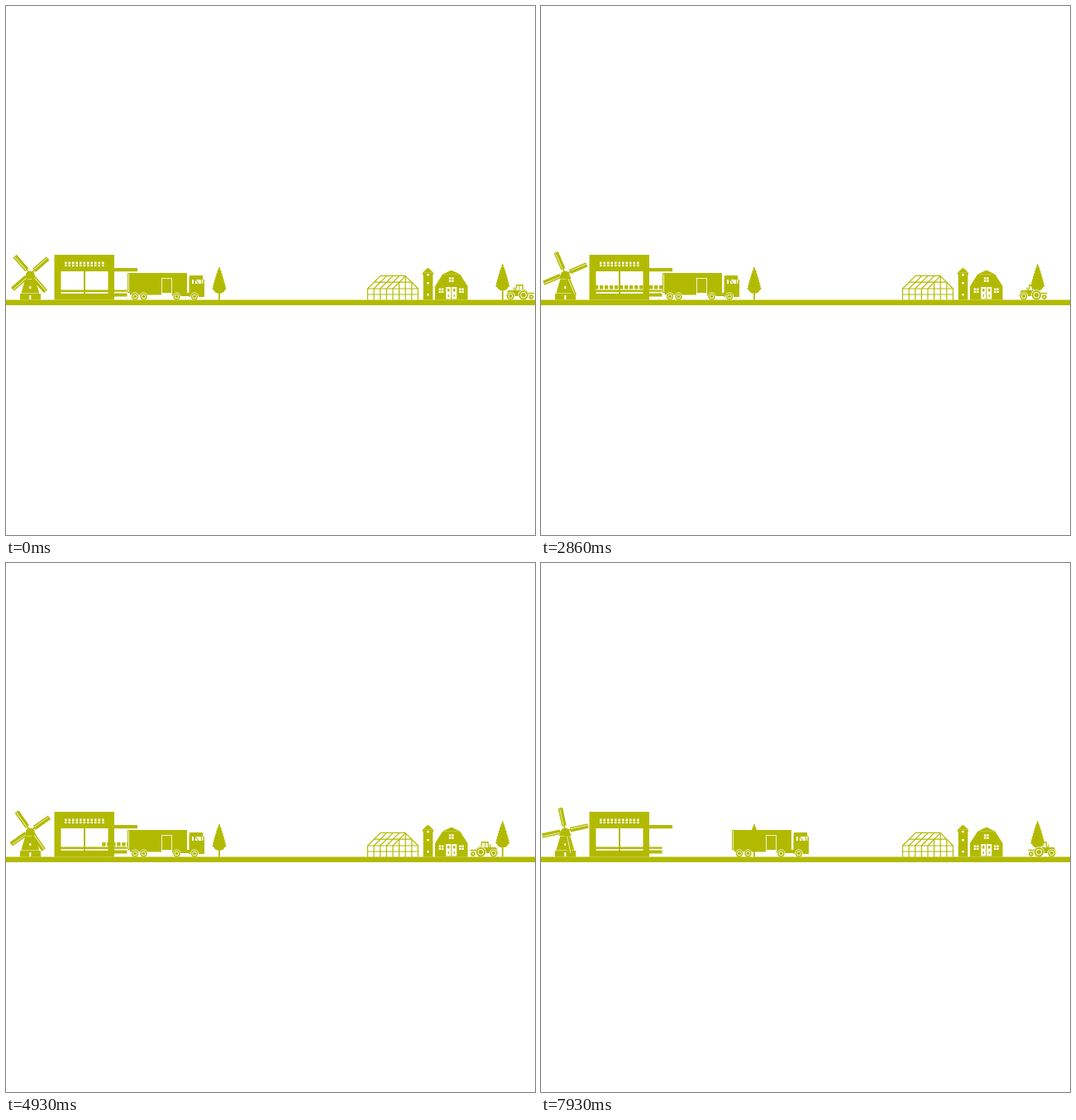
Write an HTML page with a canvas that moves like this. It is 640x640 px and loops after 8000 ms.

```html
<!DOCTYPE html>
<html lang="en">
<head>
<meta charset="utf-8">
<title>Farm to factory</title>
<style>
  html, body { margin: 0; height: 100%; overflow: hidden; background: #fff; }
  canvas { display: block; width: 100vmin; height: 100vmin; }
</style>
</head>
<body>
<canvas id="stage" width="640" height="640"></canvas>
<script>
const ctx = document.getElementById('stage').getContext('2d');
const GREEN = '#b2ba00', WHITE = '#fff';
const LOOP = 8000, FPS = 14;
const GROUND = 355.5;

function rect(x, y, w, h, color = GREEN) {
  ctx.fillStyle = color;
  ctx.fillRect(x, y, w, h);
}

function line(x1, y1, x2, y2, width = 1.2, color = GREEN) {
  ctx.beginPath();
  ctx.moveTo(x1, y1);
  ctx.lineTo(x2, y2);
  ctx.strokeStyle = color;
  ctx.lineWidth = width;
  ctx.stroke();
}

// Symmetric shape around x = cx; halfWidth(u) with u from 0 (top) to 1 (bottom)
function profile(cx, top, bottom, halfWidth, steps = 1) {
  ctx.beginPath();
  for (const side of [1, -1]) {
    for (let i = 0; i <= steps; i++) {
      const u = (side > 0 ? i : steps - i) / steps;
      ctx.lineTo(cx + side * halfWidth(u), top + (bottom - top) * u);
    }
  }
  ctx.fillStyle = GREEN;
  ctx.fill();
}

function taper(cx, top, topWidth, bottom, bottomWidth) {
  profile(cx, top, bottom, u => (topWidth + (bottomWidth - topWidth) * u) / 2);
}

function disc(x, y, r, color = GREEN, start = 0) {
  ctx.beginPath();
  ctx.arc(x, y, r, start, Math.PI * 2);
  ctx.fillStyle = color;
  ctx.fill();
}

function wheel(x, y) {
  const r = GROUND - y;
  disc(x, y, r + 0.8, WHITE);
  disc(x, y, r);
  disc(x, y, r * 0.65, WHITE);
  disc(x, y, r * 0.48);
}

function at(x, y, draw) {
  ctx.save();
  ctx.translate(x, y);
  draw();
  ctx.restore();
}

function windmill(degrees) {
  const cx = 29.3;
  disc(cx, 326, 5.5, GREEN, Math.PI);
  taper(cx, 326, 11, 330, 15);
  taper(cx, 330.5, 12, 347.5, 22);
  rect(17, 348, 25, 7.5);
  rect(cx - 1, 339, 2, 3, WHITE);
  rect(cx - 1, 350, 2, 5, WHITE);
  at(cx, 324, () => {
    ctx.rotate(degrees * Math.PI / 180);
    for (let i = 0; i < 4; i++) {
      rect(-0.8, -28, 1.6, 28);
      rect(-2.8, -28.3, 5.6, 22);
      rect(-1.2, -27.5, 0.7, 20.5, WHITE);
      ctx.rotate(Math.PI / 2);
    }
    disc(0, 0, 2.2);
  });
}

function factory() {
  rect(58.5, 301, 72.5, 54.5);
  for (let i = 0; i < 22; i++) {
    rect(71 + (i >> 1) * 4.5, 309.5 + i % 2 * 3.2, 2.5, 2.4, WHITE);
  }
  for (const x of [66.5, 96]) {
    rect(x, 321, 27.5, 22.5, WHITE);
    rect(x, 346, 27.5, 1.8, WHITE);
  }
  rect(131, 317, 28, 4.2);
  rect(131, 343.5, 15.5, 2.3);
  rect(131, 347.5, 15.5, 4);
}

function crates(t) {
  const lead = 114.5 + 45 * (t - 1.29);
  for (let i = 0; i < 28; i++) {
    const x = lead - i * 6;
    if (x > 60 && x < 152) rect(x, 338, 4.3, 4.5);
  }
}

function truck() {
  rect(147, 323, 72, 24);
  rect(148, 324, 0.8, 22, WHITE);
  ctx.strokeStyle = WHITE;
  ctx.lineWidth = 0.8;
  ctx.strokeRect(188.5, 329.5, 12, 18);
  rect(150, 347, 38, 2.5);
  rect(201, 347, 39, 4);
  taper(230, 326, 16, 331, 17);
  rect(221.5, 331, 18.5, 21);
  rect(225, 331, 2, 5, WHITE);
  rect(229, 331, 9.5, 5, WHITE);
  line(229, 331, 233, 336);
  line(236, 331, 237, 336);
  for (const x of [156, 166.5, 206.5, 228]) wheel(x, 351.4);
}

function tree(x, top) {
  const tiers = 9, steps = tiers * 2;
  const leaf = u => {
    const hull = 10 * Math.min(u ** 0.75, 3.2 * (1.12 - u));
    const notch = Math.round(u * steps) % 2 ? 0 : 0.9;
    return Math.max(0, hull - notch);
  };
  profile(x, top, top + 32, leaf, steps);
  rect(x - 0.9, top + 30, 1.8, GROUND - top - 30);
}

function greenhouse() {
  const left = 437.5, right = 498.5, ridge = 326.4, eave = 342, slope = eave - ridge;
  const peak = right - slope, bays = 8;
  line(left + slope, ridge, peak, ridge);
  line(peak, ridge, right, eave);
  line(left, eave, right, eave);
  line(left + slope / 2, ridge + slope / 2, right - slope / 2, ridge + slope / 2);
  line(left, 349, right, 349);
  for (let i = 0; i <= bays; i++) {
    const x = left + (right - left) * i / bays;
    const top = x > peak - slope ? ridge + Math.abs(x - peak) : eave;
    line(x, top, x, GROUND);
    if (i <= bays / 2) line(x + slope, ridge, x, eave);
  }
}

function silo() {
  taper(510.5, 317, 1, 322.5, 13);
  rect(504, 322.5, 13, 2.5);
  rect(504.8, 325, 11.6, 30.5);
  for (const y of [324, 334, 348]) rect(509.3, y, 2.4, 2.4, WHITE);
}

function panes(x, y) {
  for (let i = 0; i < 4; i++) {
    rect(x - 2.9 + i % 2 * 3.3, y + (i >> 1) * 3.2, 2.5, 2.3, WHITE);
  }
}

function barn() {
  const cx = 538.8;
  taper(cx, 320, 2, 324.5, 21);
  taper(cx, 324.5, 21, 339, 39.5);
  rect(cx - 19.75, 339, 39.5, 16.5);
  panes(cx, 328.3);
  for (const side of [-1, 1]) {
    const door = cx + side * 3.5;
    panes(cx + side * 12.2, 341.5);
    rect(door - 3, 340, 6, 14.5, WHITE);
    rect(door - 1.2, 342, 2.4, 3.5);
    rect(door - 0.6, 349, 1.2, 3);
  }
}

// Faces right, 35 wide
function tractor() {
  rect(0, 346.8, 8, 1.5);
  disc(3.5, 352, 2.8);
  disc(3.5, 352, 0.9, WHITE);
  rect(13.5, 337, 8.5, 1.5);
  line(14.2, 337, 13.2, 346, 1.4);
  line(18.2, 337, 17.8, 346, 0.9);
  line(21.3, 337, 22.8, 346, 1.4);
  rect(23.8, 340.5, 1.2, 4);
  disc(13, 350, 7, GREEN, Math.PI);
  taper(22, 344, 19, 351, 25);
  wheel(13, 349.8);
  wheel(28.5, 351);
}

function moveTractor(t) {
  const TURN = 4.75, SPEED = 9.3;
  const x = 604 + SPEED * (Math.abs(t - TURN) - TURN);
  at(x + 17.5, 0, () => {
    ctx.scale(t < TURN ? -1 : 1, 1);
    ctx.translate(-17.5, 0);
    tractor();
  });
}

function draw(t) {
  rect(0, 0, 640, 640, WHITE);
  windmill(49 + 37.7 * t);
  factory();
  crates(t);
  at(Math.max(0, 50 * (t - 6.25)), 0, truck);
  tree(258, 315.5);
  greenhouse();
  silo();
  barn();
  tree(600.8, 312);
  moveTractor(t);
  rect(0, GROUND, 640, 6.5);
}

function frame(now) {
  const step = Math.floor((now % LOOP) / 1000 * FPS + 0.07);
  draw(step / FPS);
  requestAnimationFrame(frame);
}
requestAnimationFrame(frame);
</script>
</body>
</html>
```
